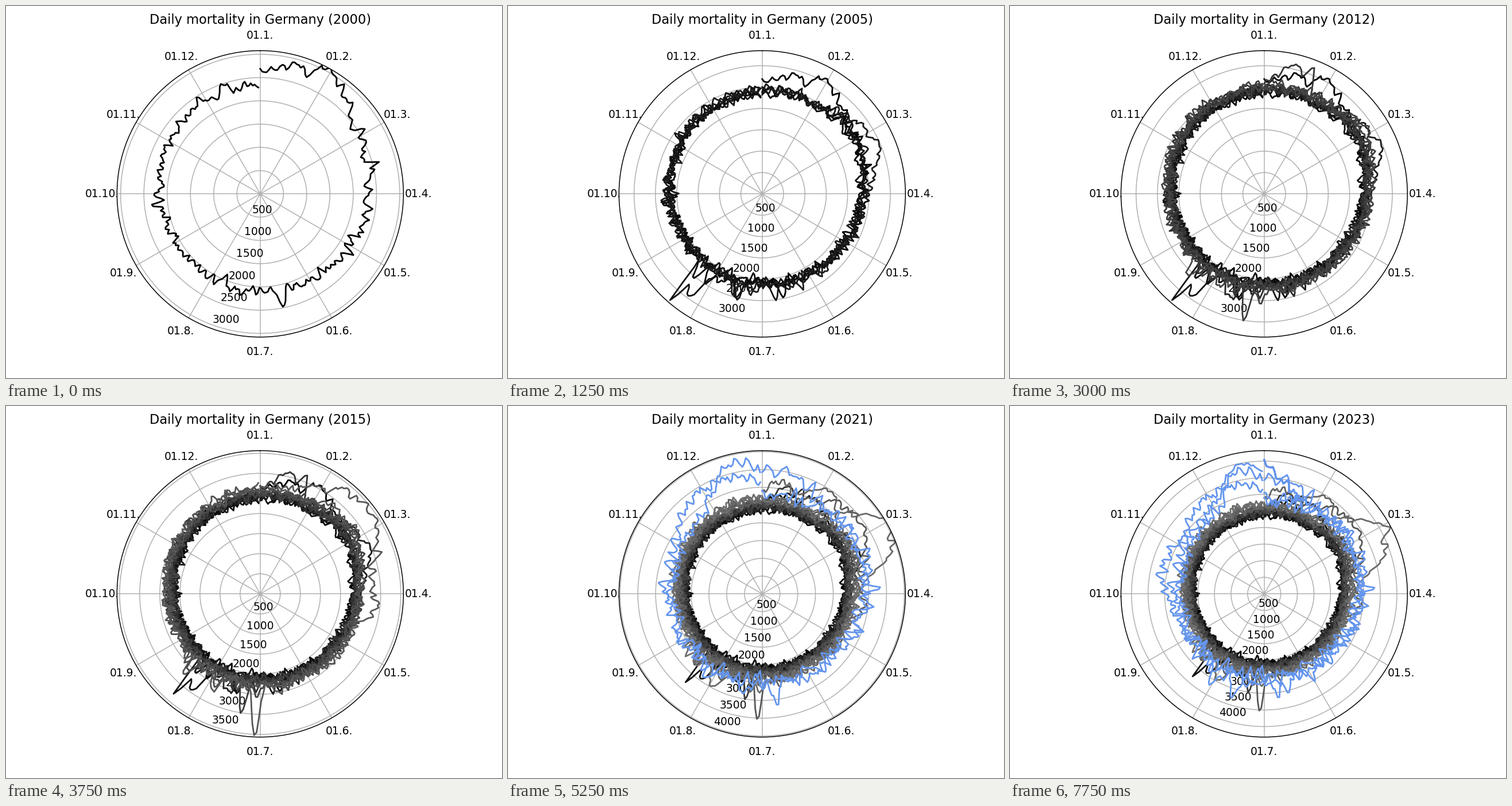
Write a matplotlib script that moves like this. It is 864x648 px and loops after 8.25 s.

```python
import numpy as np
import matplotlib.pyplot as plt
from matplotlib.animation import FuncAnimation

FIRST, LAST, BLUE_FROM = 2000, 2023, 2020
STEPS = 33
DAYS = np.arange(365)
THETA = 2 * np.pi * DAYS / 365

# Outstanding flu and heat waves: year -> (day, extra deaths, width in days)
PEAKS = {
    2000: [(25, 400, 22), (32, 230, 4), (171, 430, 1.5)],
    2003: [(220, 650, 3), (224, 900, 1)],
    2005: [(66, 400, 13)],
    2009: [(14, 560, 9), (22, 350, 1)],
    2010: [(192, 800, 1.5)],
    2015: [(48, 600, 22), (98, 330, 7), (185, 1080, 1.6)],
    2017: [(8, 550, 6), (33, 800, 8)],
    2018: [(65, 1200, 12), (212, 550, 4)],
    2020: [(96, 300, 12), (356, 950, 15)],
    2021: [(6, 720, 16), (338, 640, 18)],
    2022: [(200, 650, 2), (214, 560, 2), (289, 430, 13), (357, 1100, 9)],
    2023: [(-3, 980, 10)],
}

# Outer edge of the radial axis from the given year on
LIMITS = {2000: 3079, 2003: 3353.5, 2015: 3566, 2017: 3585, 2018: 4032, 2022: 4317}


def wave(day, height, width):
    return height * np.exp(-0.5 * ((DAYS - day) / width) ** 2)


def deaths(year):
    rng = np.random.default_rng(year)
    age = year - FIRST
    level = 2245 + 0.85 * age**2 + 45 * max(0, year - BLUE_FROM + 1)
    season = 170 * np.cos(2 * np.pi * (DAYS - 30) / 365)
    spread = 115 if year >= BLUE_FROM else 75
    noise = np.convolve(rng.standard_normal(367), [0.35, 0.85, 0.35], "valid")
    total = level + season + spread * noise
    for peak in PEAKS.get(year, []):
        total += wave(*peak)
    # ordinary late winter flu and short summer heat
    if FIRST < year < LAST:
        total += wave(rng.uniform(48, 70), rng.uniform(80, 280), 14)
        for _ in range(2):
            total += wave(rng.uniform(165, 235), rng.uniform(200, 450), 1.8)
    return total


def color(year):
    return "cornflowerblue" if year >= BLUE_FROM else (0.023 * (year - FIRST),) * 3


def year_at(step):
    return min(FIRST + step, LAST)


fig = plt.figure(figsize=(6.4, 4.8), dpi=135)
ax = fig.add_subplot(projection="polar")
ax.set_theta_zero_location("N")
ax.set_theta_direction(-1)
ax.set_xticks(np.arange(12) * np.pi / 6, labels=[f"01.{m}." for m in range(1, 13)])
ax.set_rlabel_position(200)

# The unfinished last year is drawn over itself until the loop ends
lines = []
for step in range(STEPS):
    year = year_at(step)
    n = 28 if year == LAST else 365
    lines += ax.plot(THETA[:n], deaths(year)[:n], color=color(year))


def update(step):
    year = year_at(step)
    for k, line in enumerate(lines):
        line.set_visible(k <= step)
    top = [limit for start, limit in LIMITS.items() if start <= year][-1]
    ax.set_yticks(np.arange(500, top, 500))
    ax.set_ylim(0, top)
    ax.set_title(f"Daily mortality in Germany ({year})")
    return lines


anim = FuncAnimation(fig, update, frames=STEPS, interval=250, repeat=True, repeat_delay=0)
plt.show()
```
